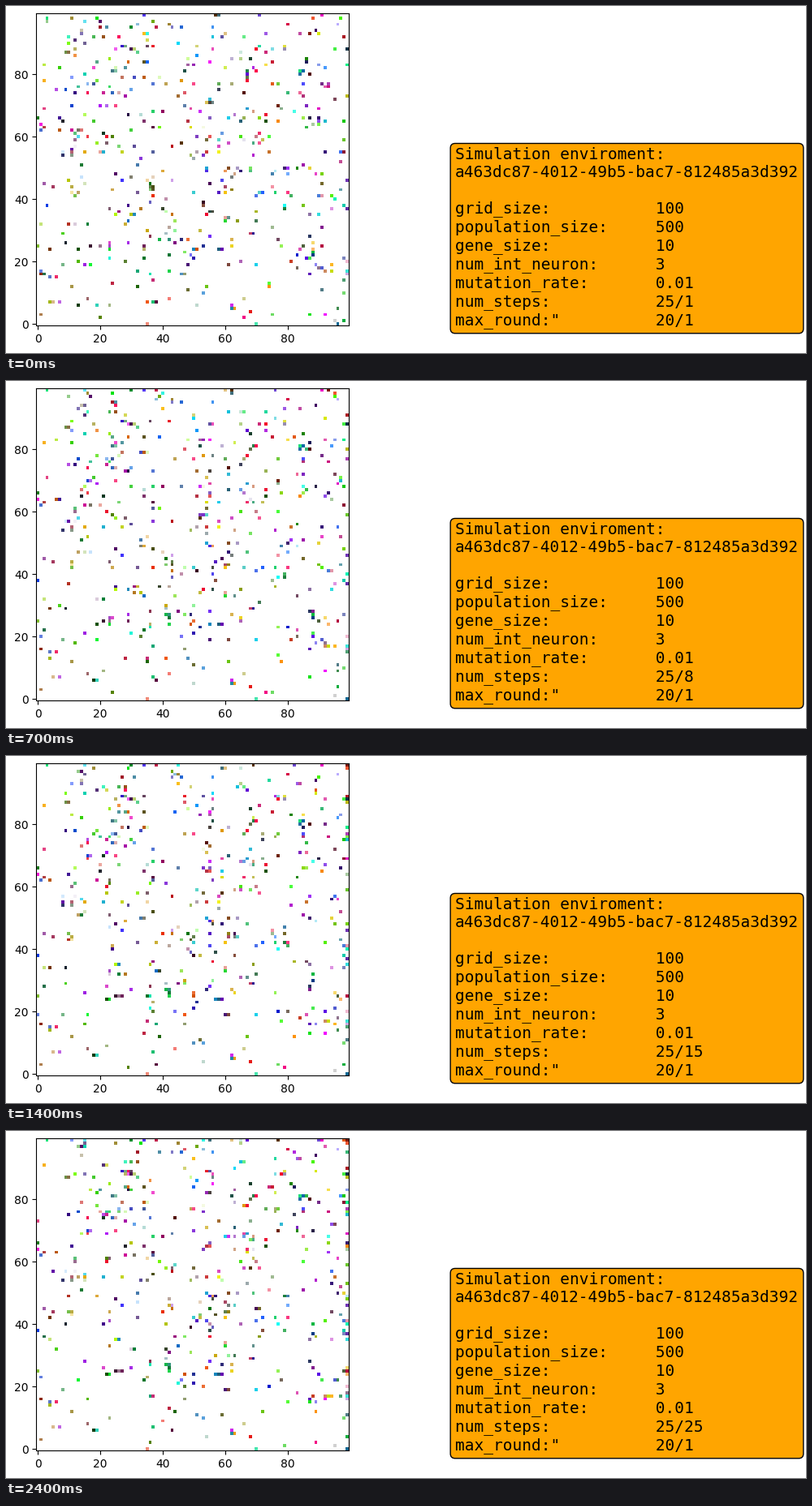
Write a matplotlib script that moves like this. It is 985x428 px and loops after 2500 ms.

```python
import numpy as np
import matplotlib.pyplot as plt
from matplotlib.animation import FuncAnimation
from matplotlib.colors import to_rgb

W, H, DPI = 985, 428, 100
SIZE, POP, STEPS = 100, 500, 25

# Agents that never leave their cell.
SETTLED = [
    (0, 66, "#1f7d1f"), (0, 25, "#86c232"), (1, 62, "#4a6fd0"),
    (1, 3, "#b08050"), (5, 7, "#d8b98c"), (35, 0, "#f08a78"),
    (14, 51, "#1e7a34"), (4, 15, "#5b78c8"), (2, 45, "#a05aa8"),
    (99, 16, "#c8a8e0"), (99, 20, "#f2b8d0"), (95, 1, "#d0d0d0"),
]

# Headings and how common they are: still, wander, right, up, diagonal, left.
HEADINGS = np.array([(0, 0), (0, 0), (1, 0), (0, 1), (1, 1), (-1, 0)])
SHARE = [0.26, 0.29, 0.24, 0.14, 0.05, 0.02]
STILL, WANDER = 0, 1


def simulate():
    rng = np.random.default_rng(7)
    rows = np.arange(SIZE * SIZE) // SIZE
    weight = np.where(rows < 15, 0.5, 1.0)
    for x, y, _ in SETTLED:
        weight[y * SIZE + x] = 0
    n = POP - len(SETTLED)
    cells = rng.choice(SIZE * SIZE, n, replace=False, p=weight / weight.sum())

    pos = [(x, y) for x, y, _ in SETTLED]
    pos += [(int(c) % SIZE, int(c) // SIZE) for c in cells]
    colors = np.vstack([[to_rgb(c) for _, _, c in SETTLED], rng.random((n, 3))])
    kind = np.r_[np.full(len(SETTLED), STILL), rng.choice(len(SHARE), n, p=SHARE)]
    pace = rng.uniform(0.55, 1.0, POP)

    taken = set(pos)
    grids = np.ones((STEPS, SIZE, SIZE, 3))
    for grid in grids:
        for i, (x, y) in enumerate(pos):
            if kind[i] == STILL or rng.random() > pace[i]:
                continue
            dx, dy = rng.integers(-1, 2, 2) if kind[i] == WANDER else HEADINGS[kind[i]]
            new = (min(max(x + int(dx), 0), SIZE - 1),
                   min(max(y + int(dy), 0), SIZE - 1))
            if new not in taken:
                taken.remove((x, y))
                taken.add(new)
                pos[i] = new
        xs, ys = np.array(pos).T
        grid[ys, xs] = colors
    return grids


def report(step):
    rows = [
        ("grid_size:", SIZE), ("population_size:", POP), ("gene_size:", 10),
        ("num_int_neuron:", 3), ("mutation_rate:", 0.01),
        ("num_steps:", f"{STEPS}/{step}"), ('max_round:"', "20/1"),
    ]
    head = ["Simulation enviroment:", "a463dc87-4012-49b5-bac7-812485a3d392", ""]
    return "\n".join(head + [f"{name:<21}{value}" for name, value in rows])


grids = simulate()

plt.rcParams["font.family"] = "DejaVu Sans"
fig = plt.figure(figsize=(W / DPI, H / DPI), dpi=DPI, facecolor="white")
ax = fig.add_axes([37.3 / W, 33.7 / H, 385 / W, 385 / H])
image = ax.imshow(grids[0], origin="lower", interpolation="nearest", aspect="auto")
ax.set_xticks(range(0, SIZE, 20))
ax.set_yticks(range(0, SIZE, 20))

label = fig.text(553 / W, 35 / H, report(1), family="DejaVu Sans Mono", fontsize=14,
                 va="baseline", bbox=dict(boxstyle="round", facecolor="orange"))


def update(i):
    image.set_data(grids[i])
    label.set_text(report(i + 1))
    return image, label


anim = FuncAnimation(fig, update, frames=STEPS, interval=100, repeat=True,
                     repeat_delay=0, blit=False)
plt.show()
```
